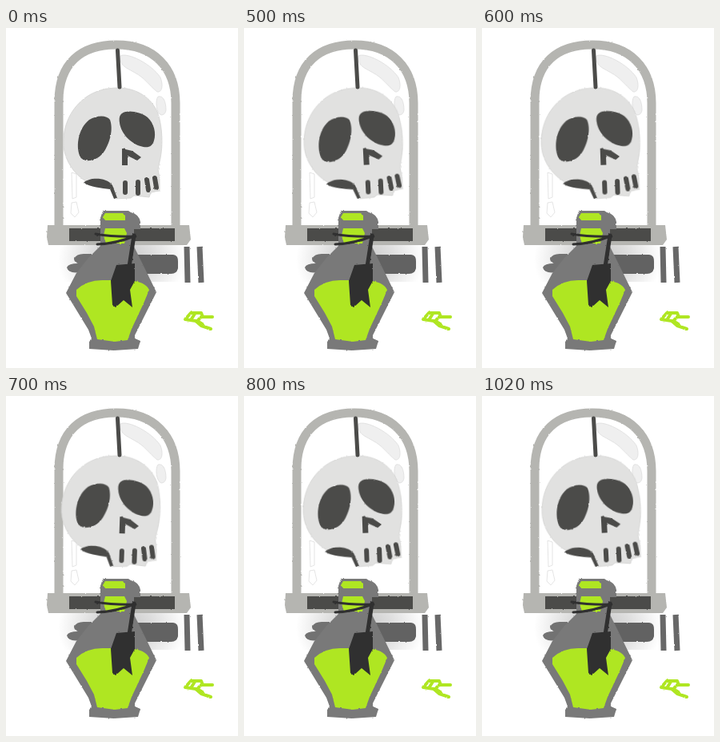
Write an HTML page that moves like this. It is 290x426 px and loops after 1100 ms.

```html
<!DOCTYPE html>
<html lang="en">
<head>
<meta charset="utf-8">
<title>Skull in a bell jar</title>
<style>
  html, body { margin: 0; width: 100%; height: 100%; overflow: hidden; background: #fff; }
  svg { display: block; width: 100%; height: 100%; }
  .line { fill: none; stroke-linecap: round; stroke-linejoin: round; }
  .ink { fill: #4b4b49; }
  .inkline { stroke: #4b4b49; }
  .lime { fill: #afe622; }
  .shine { fill: #efefef; stroke: #dedede; stroke-width: .8; }
</style>
</head>
<body>
<svg viewBox="0 0 290 426">
  <defs>
    <filter id="rough" x="-5%" y="-5%" width="110%" height="110%" color-interpolation-filters="sRGB">
      <feTurbulence type="fractalNoise" baseFrequency=".3" numOctaves="2" seed="4"/>
      <feDisplacementMap in="SourceGraphic" scale="2" xChannelSelector="R" yChannelSelector="G"/>
    </filter>
    <radialGradient id="shade" gradientUnits="userSpaceOnUse" cx="145" cy="290" r="80" gradientTransform="matrix(1 0 0 .8 0 58)">
      <stop offset="0" stop-color="#c4c4c4"/>
      <stop offset=".5" stop-color="#dedede"/>
      <stop offset="1" stop-color="#fff"/>
    </radialGradient>
  </defs>

  <path fill="url(#shade)" d="M62 270H230V318H62Z"/>

  <g filter="url(#rough)">
    <!-- pegs behind the bottle -->
    <path fill="#727272" d="M85 289Q88 283 97 283H125V306H92Q78 308 76 300Q78 295 90 295Q85 293 85 289Z"/>
    <path fill="#626262" d="M160 284H209Q215 285 215 291V301Q214 308 206 308H160Z"/>
    <path class="line" stroke="#686868" stroke-width="7" style="stroke-linecap:butt" d="M226 274L227 319M242 274L244 319"/>

    <!-- bell jar -->
    <path class="line" stroke="#b5b5b1" stroke-width="11" d="M66 252V92C66 44 94 21 138 21C185 21 212 50 212 94V252"/>
    <path fill="#b5b5b1" d="M52 247H229L231 265L226 272H53L51 262Z"/>
    <path class="ink" d="M79 251H211V267H79Z"/>

    <!-- bottle -->
    <path fill="#797979" d="M121 229H153L156 231Q166 233 168 243V252H160V274L169 292L188 331L161 385V389L168 392L165 402L135 404L104 402V392L107 389L103 378L75 332L88 307L103 288L118 273V238Z"/>
    <path class="lime" d="M124 232H146L149 235V241H124L121 237ZM124 251H148L151 257L148 270H125L122 260Z"/>
    <path class="lime" d="M88 328Q101 316 120 316H151Q174 317 179 328L172 345L157 377L152 391L136 393L114 390L110 374L101 357L88 336Z"/>

    <!-- cord and arrow -->
    <g class="line" stroke="#303030">
      <path stroke-width="3" d="M112 258Q135 262 162 261M114 271Q138 270 160 261"/>
      <path stroke-width="5" d="M160 260L154 299"/>
    </g>
    <path fill="#303030" d="M138 297L161 295V317L155 328L158 350L147 341L137 350L133 347L131 317Z"/>

    <path class="line" stroke="#afe622" stroke-width="4" d="M224 365L231 357L244 357L246 362L258 362M224 365L237 367L244 373L256 377M236 358L231 366M244 362L239 367L247 372"/>
  </g>

  <g class="shine">
    <path d="M143 35C152 30 182 45 193 62C197 72 195 81 189 80C179 72 173 62 161 56C151 50 141 47 143 35Z"/>
    <path d="M190 86C197 84 200 93 200 103Q199 109 194 109C188 107 186 91 190 86Z"/>
    <path style="fill:#fff" d="M82 181L88 183V212L83 214ZM82 219L88 218L91 231L86 237L81 232Z"/>
  </g>

  <g id="skull">
    <g filter="url(#rough)">
      <path fill="#e1e1e0" stroke="#d2d2d1" stroke-width=".8" d="M140 75C163 75 182 87 190 107C196 126 196 148 193 163L190 177L192 188V204L181 206L179 212L160 210L156 213L137 214L132 199L120 190L100 192C86 184 74 167 72 149C70 122 82 99 101 86C113 78 126 75 140 75Z"/>
      <path class="ink" d="M104 115C114 109 126 109 130 115C135 129 128 148 121 157C113 167 98 169 93 162C87 151 89 127 104 115Z"/>
      <path class="ink" d="M145 107C152 102 168 105 177 112C185 119 188 132 185 141C183 149 177 151 168 148C155 144 144 132 142 119C141 113 142 109 145 107Z"/>
      <path class="ink" d="M97 194C103 187 125 186 133 197L139 213L135 214L130 202C120 201 105 199 97 194Z"/>
      <path class="ink" d="M145 151L158 154L169 162L164 166L152 160V172H145Z"/>
      <path class="line inkline" stroke-width="6" d="M149 194V206M165 193V207M176 190L178 203M186 188L188 200"/>
    </g>
  </g>

  <path class="line inkline" stroke-width="5" d="M139.5 28L142 74"/>
</svg>
<script>
  const skull = document.getElementById('skull');
  const loop = 1100;
  // Held poses: [start in ms, swing in degrees about the end of the cord]
  const poses = [[0, 0], [500, -2.8], [600, -2], [700, 2], [800, -2], [900, -2.8]];
  const start = performance.now();

  function draw() {
    const t = (performance.now() - start) % loop;
    const [, angle] = poses.findLast(([from]) => t >= from);
    skull.setAttribute('transform', `rotate(${angle} 140 75)`);
    requestAnimationFrame(draw);
  }
  draw();
</script>
</body>
</html>
```
